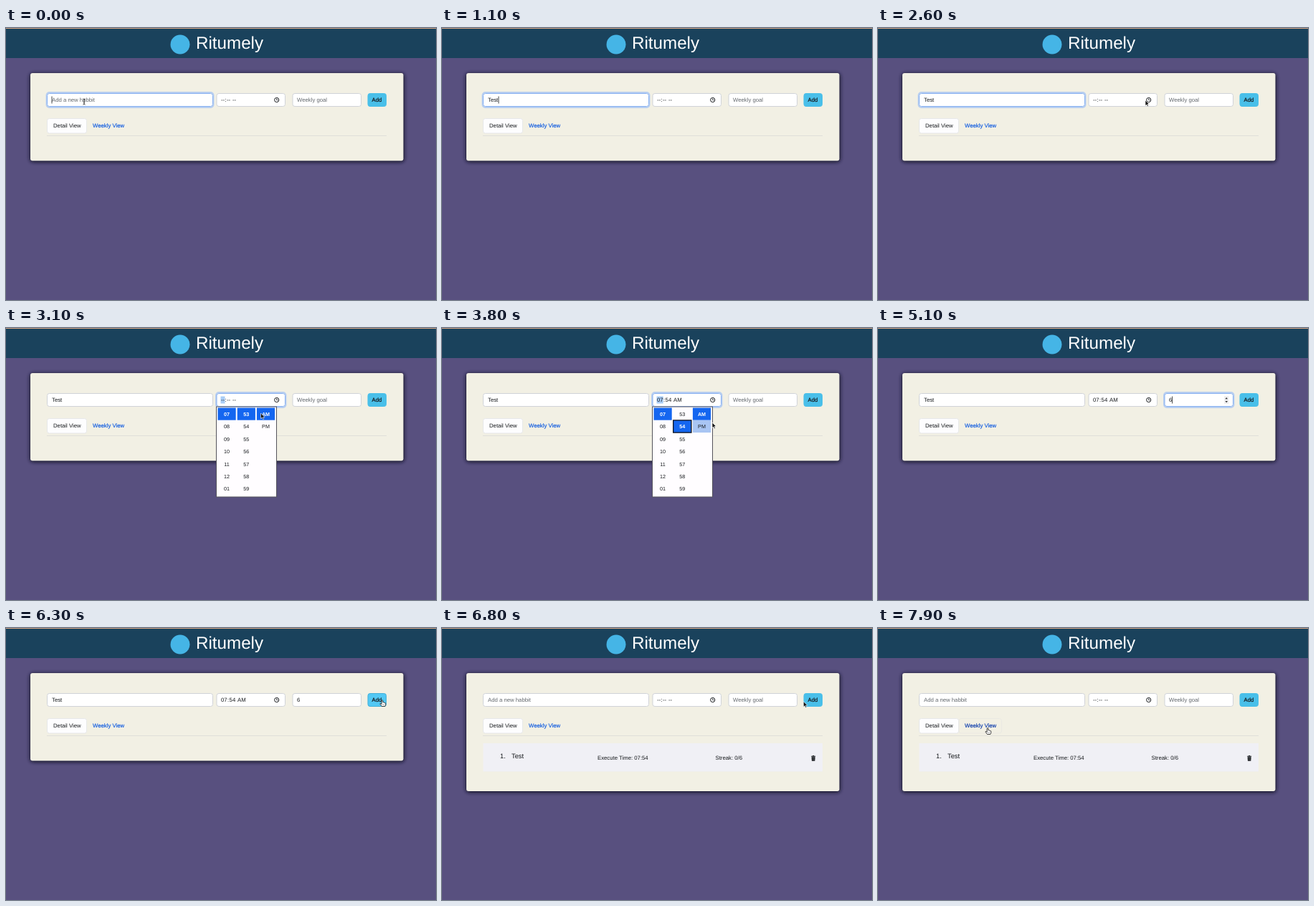
Recreate the animation shown at these times as an HTML page. Size 600x380 px, loop 8 s.

```html
<!DOCTYPE html>
<html lang="en">
<head>
<meta charset="utf-8">
<title>Habit tracker</title>
<style>
  html, body { margin: 0; width: 100%; height: 100%; overflow: hidden; background: #58507f; }
  svg { display: block; width: 600px; height: 380px; }
  text { font: 7.75px "Liberation Sans", Arial, sans-serif; fill: #16191c; text-rendering: geometricPrecision; white-space: pre; }
  .strong { stroke-width: .2px; stroke: currentColor; }
</style>
</head>
<body>
<svg viewBox="0 0 600 380">
  <defs>
    <filter id="blur" x="-10%" y="-20%" width="120%" height="140%"><feGaussianBlur stdDeviation="2.6"/></filter>
  </defs>
  <rect width="600" height="380" fill="#58507f"/>
  <rect width="600" height="42" fill="#1a425c"/>
  <rect width="600" height="1" fill="#d9a583"/>
  <circle cx="243" cy="23" r="13.5" fill="#45b5e6"/>
  <text x="265" y="29" style="font-size:24.2px;fill:#fff">Ritumely</text>
  <g id="scene"></g>
</svg>
<script>
const LOOP = 8000;
const TYPING = [600, 700, 800, 1000];
const OPEN = 2800, PICK = 3400, CLOSE = 4400, GOAL = 4900, PRESS = 6200, ADDED = 6500;
const INK = '#16191c', HINT = '#63686d', BLUE = '#1466f0';

// Pointer waypoints: time, x, y
const PATH = [
  [0, 109, 103], [1900, 109, 103], [2500, 373, 101], [2900, 373, 101],
  [3300, 338, 137], [3500, 338, 137], [3800, 377, 132], [4300, 435, 102],
  [5300, 435, 102], [6100, 525, 100.5], [6700, 525, 100.5], [7400, 153, 139.5], [LOOP, 153, 139.5]
];

const rect = (x, y, w, h, fill, extra = '') =>
  `<rect x="${x}" y="${y}" width="${w}" height="${h}" fill="${fill}" ${extra}/>`;
const text = (x, y, str, fill = INK, extra = '') =>
  `<text x="${x}" y="${y}" style="fill:${fill}" ${extra}>${str}</text>`;
const line = (d, color = INK, width = 1) =>
  `<path d="${d}" fill="none" stroke="${color}" stroke-width="${width}"/>`;
const strong = color => `class="strong" color="${color}"`;
const blink = (t, since) => (t - since) % 1000 < 500;
const caret = x => rect(x, 95.5, .8, 10, INK);

function pointerAt(t) {
  const i = PATH.findIndex(p => p[0] > t);
  const [t0, x0, y0] = PATH[i - 1], [t1, x1, y1] = PATH[i];
  const u = (t - t0) / (t1 - t0), k = u * u * (3 - 2 * u);
  return { x: x0 + (x1 - x0) * k, y: y0 + (y1 - y0) * k };
}

function field(x, w, focused) {
  const ring = focused ? rect(x - 1, 90, w + 2, 21, 'none', 'rx="4" stroke="#b9cff0" stroke-width="2"') : '';
  return ring + rect(x, 91.5, w, 18, '#fff', `rx="3" stroke="${focused ? '#86b0f2' : '#d0d3d8'}" stroke-width="1"`);
}

function card(h) {
  return rect(33, 63, 523, h + 2, '#17142a', 'rx="5" filter="url(#blur)"')
    + rect(34, 63, 520.5, h, '#f2f0e4', 'rx="3"');
}

function habitInput(t) {
  const typed = TYPING.filter(k => k <= t).length;
  const cleared = t >= ADDED;
  const value = cleared ? '' : 'Test'.slice(0, typed);
  const focused = t < OPEN;
  const since = typed ? TYPING[typed - 1] : -400;
  const end = [63.6, 68.7, 72.9, 76.6, 78.6][typed];
  return field(57.5, 231, focused)
    + text(64, 103.2, value || 'Add a new habbit', value ? INK : HINT)
    + (focused && blink(t, since) ? caret(end) : '');
}

function timeInput(t) {
  const focused = t >= OPEN && t < CLOSE;
  const filled = t >= PICK && t < ADDED;
  const parts = filled
    ? [[300, '07'], [309, ':'], [311.6, '54'], [323, 'AM']]
    : [[300, '--'], [305.6, ':'], [308, '--'], [316, '--']];
  return field(294, 95.5, focused)
    + (focused ? rect(299.5, 95.5, filled ? 9.2 : 6, 10, '#a9cdf6') : '')
    + parts.map(([x, s]) => text(x, 103.2, s)).join('')
    + `<circle cx="377.7" cy="100.5" r="3.1" fill="none" stroke="${INK}"/>`
    + line('M377.7 98.4V100.7H379.5', INK, .8);
}

function goalInput(t) {
  const focused = t >= CLOSE && t < PRESS;
  const filled = t >= GOAL && t < ADDED;
  const spinner = rect(483, 95, 6.5, 11, '#efeff1')
    + `<path d="M484.4 99.2l1.8-2.3 1.8 2.3zM484.4 101.9l1.8 2.3 1.8-2.3z" fill="#333"/>`;
  return field(400, 95.5, focused)
    + text(406, 103.2, filled ? '6' : 'Weekly goal', filled ? INK : HINT)
    + (focused ? spinner : '')
    + (focused && blink(t, filled ? GOAL : CLOSE) ? caret(filled ? 410.3 : 405.8) : '');
}

function addButton(hover) {
  return rect(505, 91.5, 25.5, 18, hover ? '#53c8f4' : '#49bfe9', `rx="3" stroke="${hover ? '#42afd8' : '#49bfe9'}"`)
    + text(510.5, 103.2, 'Add', INK, strong(INK));
}

function tabs(hover) {
  const link = hover ? '#1240ad' : '#1760e0';
  return line('M57 150.5H531', '#e0dfda')
    + rect(57.5, 126.5, 55, 20.5, '#fdfdfe', 'rx="3" stroke="#e3e4e6" stroke-width=".8"')
    + text(66, 138.7, 'Detail View')
    + (hover ? rect(113, 126.5, 59.5, 20.5, 'none', 'rx="3" stroke="#e9e8e2" stroke-width=".8"') : '')
    + text(121, 138.7, 'Weekly View', link, strong(link));
}

function habitRow() {
  return rect(57.5, 161, 473.5, 39.5, '#f0f0f5')
    + text(81, 182.3, '1.', INK, 'font-size="9.3" transform="translate(81 182.3) scale(1.2) translate(-81 -182.3)"')
    + text(97, 182.3, 'Test', INK, 'transform="translate(97 182.3) scale(1.2) translate(-97 -182.3)"')
    + text(217, 183.7, 'Execute Time: 07:54')
    + text(381.5, 183.7, 'Streak: 0/6')
    + `<path d="M515.2 178.8h1.7l.5-.8h1.5l.5.8h1.7v1h-5.9zM515.6 180.3h5.1l-.4 5.4h-4.3z" fill="${INK}"/>`
    + line('M517.3 181.3v3.4M519 181.3v3.4', '#aaa', .4);
}

function picker(t, mouse) {
  const pad = n => String(n).padStart(2, '0');
  const rows = [...Array(7).keys()];
  const columns = [rows.map(i => pad((i + 6) % 12 + 1)), rows.map(i => pad(53 + i)), ['AM', 'PM']];
  const minute = t >= PICK ? 1 : 0;
  let out = rect(293.5, 110, 84, 126, '#fffdff', 'stroke="#55545c" stroke-width="1"');
  columns.forEach((cells, c) => cells.forEach((label, r) => {
    const x = 295.5 + c * 27.2, y = 111.5 + r * 17.4;
    const selected = r === (c === 1 ? minute : 0);
    const hover = mouse.x >= x && mouse.x < x + 27.2 && mouse.y >= y && mouse.y < y + 17.4;
    const outline = selected && c === minute ? 'stroke="#10131c" stroke-width="1.3"' : '';
    if (selected || hover) out += rect(x, y, 25.2, 17.2, selected ? BLUE : '#a9c5f3', c === 1 ? outline : '');
    out += text(x + 12.6, y + 11.4, label, selected ? '#fff' : INK,
      `text-anchor="middle" ${selected ? 'font-weight="bold"' : ''}`).replace('style="', 'style="font-size:7.2px;' + (selected ? 'font-weight:bold;' : ''));
  }));
  return out;
}

function pointer({ x, y }, kind) {
  const shapes = {
    beam: line('M-1.6-4Q0-4 0-2.8Q0-4 1.6-4M0-3V3M-1.6 4Q0 4 0 2.8Q0 4 1.6 4M-.9 1H.9', '#222', .8),
    arrow: '<path d="M0 0V7.6L1.8 6 3 8.7 4.3 8.1 3.1 5.5H5.5Z" fill="#111" stroke="#fff" stroke-width=".6"/>',
    hand: '<path d="M-.9.7Q0-.6.9.7V3.4Q1.7 2.9 2.2 3.7Q3 3.3 3.5 4.1Q4.6 3.8 4.7 5V6.8L3.8 9H-.5L-2.9 5.9Q-3.2 4.6-1.9 5L-.9 6Z" fill="#fff" stroke="#111" stroke-width=".8"/>'
      + line('M1 5.8v1.7M2.4 5.8v1.7', '#333', .4)
  };
  return `<g transform="translate(${x} ${y})">${shapes[kind]}</g>`;
}

function scene(t) {
  const mouse = pointerAt(t), { x, y } = mouse;
  const inside = (l, top, r, b) => x >= l && x <= r && y >= top && y <= b;
  const open = t >= OPEN && t < CLOSE;
  const onAdd = inside(505, 91, 531, 110);
  const onTab = inside(113, 126, 173, 147);
  const onText = !open && (inside(57, 91, 289, 110) || inside(294, 91, 370, 110) || inside(400, 91, 483, 110));
  const hidden = (t >= TYPING[0] && t < 1900) || (t >= GOAL && t < 5300);
  const added = t >= ADDED;
  return card(added ? 165 : 122.5) + habitInput(t) + timeInput(t) + goalInput(t)
    + addButton(onAdd) + tabs(onTab)
    + (added ? habitRow() : '')
    + (open ? picker(t, mouse) : '')
    + (hidden ? '' : pointer(mouse, onAdd || onTab ? 'hand' : onText ? 'beam' : 'arrow'));
}

const stage = document.getElementById('scene');
const start = performance.now();
let shown = -1;
function draw() {
  const t = Math.floor((performance.now() - start) % LOOP / 100) * 100;
  if (t !== shown) stage.innerHTML = scene(shown = t);
  requestAnimationFrame(draw);
}
draw();
</script>
</body>
</html>
```
